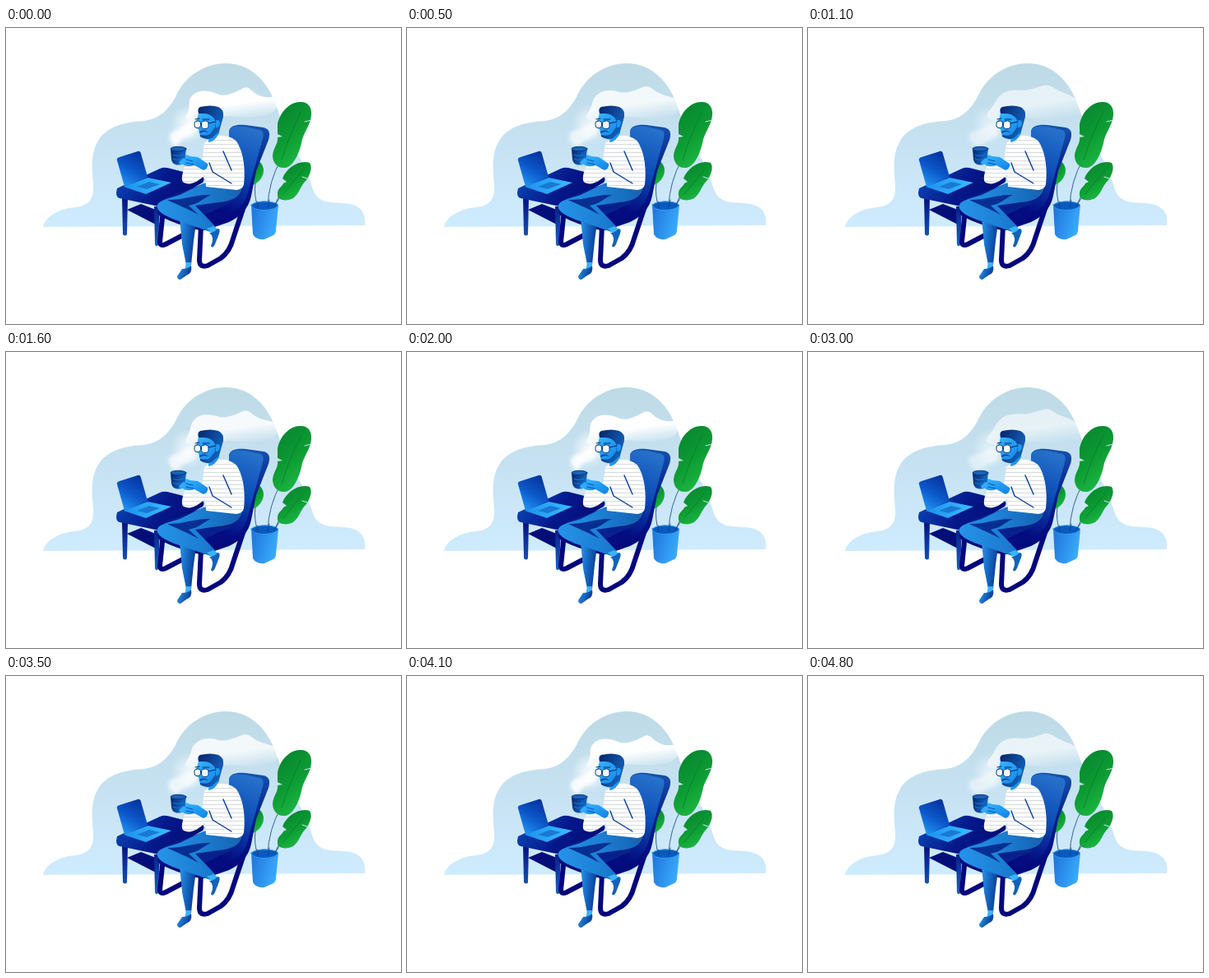
An HTML page that plays this animation: 480x360 px, repeating every 5 s.

```html
<!DOCTYPE html>
<html lang="en">
<head>
<meta charset="utf-8">
<title>Coffee break</title>
<style>
html, body { margin: 0; width: 100%; height: 100%; overflow: hidden; background: #fff; }
svg { display: block; width: 100vw; height: 100vh; }
</style>
</head>
<body>
<svg viewBox="0 0 480 360" fill="none" stroke-linecap="round" stroke-linejoin="round">
  <defs>
    <linearGradient id="sky" x2="0" y2="1"><stop stop-color="#bedae6"/><stop offset="1" stop-color="#cfebff"/></linearGradient>
    <linearGradient id="screen" x1=".2" y1="1" x2=".7" y2="0"><stop stop-color="#2298f3"/><stop offset=".5" stop-color="#0b57ca"/><stop offset="1" stop-color="#06339c"/></linearGradient>
    <linearGradient id="desk" y2=".3"><stop stop-color="#0c4cba"/><stop offset=".6" stop-color="#05188a"/><stop offset="1" stop-color="#040d78"/></linearGradient>
    <linearGradient id="post" x2="0" y2="1"><stop stop-color="#041080"/><stop offset="1" stop-color="#1765c4"/></linearGradient>
    <linearGradient id="keys"><stop stop-color="#1c92ee"/><stop offset="1" stop-color="#3bbcff"/></linearGradient>
    <linearGradient id="seat" x1=".8" x2=".4" y2="1"><stop stop-color="#2671ca"/><stop offset=".4" stop-color="#0c4bb5"/><stop offset=".8" stop-color="#040c80"/></linearGradient>
    <linearGradient id="rim" x2="0" y2="1"><stop stop-color="#1553ad"/><stop offset=".45" stop-color="#051c8b"/><stop offset="1" stop-color="#03067a"/></linearGradient>
    <linearGradient id="jeans"><stop stop-color="#2593e8"/><stop offset=".5" stop-color="#1c7fd4"/><stop offset="1" stop-color="#1561b0"/></linearGradient>
    <linearGradient id="shin" x2="1" y2=".3"><stop stop-color="#2897ed"/><stop offset="1" stop-color="#083c98"/></linearGradient>
    <linearGradient id="skin" x2=".8" y2="1"><stop stop-color="#3bb6ff"/><stop offset="1" stop-color="#1287e8"/></linearGradient>
    <linearGradient id="hair" x2="1" y2=".6"><stop stop-color="#06246b"/><stop offset="1" stop-color="#1464bc"/></linearGradient>
    <linearGradient id="leaf" x1=".2" x2=".7" y2="1"><stop stop-color="#078331"/><stop offset=".5" stop-color="#0c9a32"/><stop offset="1" stop-color="#20bd45"/></linearGradient>
    <linearGradient id="pot" y1=".2" x2="1" y2=".6"><stop stop-color="#1f75dc"/><stop offset="1" stop-color="#3aaefe"/></linearGradient>
    <linearGradient id="mug" x2="1" y2=".4"><stop stop-color="#052067"/><stop offset="1" stop-color="#146bc9"/></linearGradient>
    <linearGradient id="mist" gradientUnits="userSpaceOnUse" x1="275" y1="78" x2="280" y2="114"><stop offset=".4" stop-color="#fff"/><stop offset="1" stop-color="#fff" stop-opacity="0"/></linearGradient>
    <radialGradient id="glow"><stop stop-color="#fff"/><stop offset=".35" stop-color="#fff" stop-opacity=".8"/><stop offset="1" stop-color="#fff" stop-opacity="0"/></radialGradient>
    <filter id="soft" x="-50%" y="-50%" width="200%" height="200%"><feGaussianBlur stdDeviation="2"/></filter>
    <clipPath id="shirtClip"><use href="#shirt"/></clipPath>
  </defs>

  <path fill="url(#sky)" d="M45 242C48 229 64 220 84 218C103 216 107 206 106 190C104 168 103 152 112 137C123 119 146 114 168 113C188 110 198 98 206 84C216 60 240 43 267 43C292 43 310 58 321 78C334 102 337 130 351 149C365 166 369 186 374 199C382 216 402 211 418 214C432 217 438 227 436 240Z"/>

  <g id="steam">
    <ellipse id="halo" cx="222" cy="117" rx="22" ry="24" fill="url(#glow)"/>
    <path id="cloud" fill="url(#mist)"/>
    <path id="plume" fill="#fff" filter="url(#soft)"/>
  </g>

  <!-- plant -->
  <path stroke="#163f72" stroke-width=".8" d="M303 188Q301 204 306 218M334 160Q319 187 318 217M340 200Q330 207 326 218"/>
  <g fill="url(#leaf)">
    <path d="M297 161C305 157 313 165 313 173C313 183 304 191 296 192Z"/>
    <path d="M330 117C333 102 345 90 357 90C367 89 372 97 371 106C370 119 361 127 359 140C356 153 349 169 339 170C330 171 324 164 324 155C325 145 331 141 330 133L336 132L330 129Z"/>
    <path d="M336 183C341 170 356 160 369 164C373 170 369 179 365 185C359 190 356 202 349 207C342 211 331 210 330 204C329 195 335 194 337 189L341 187Z"/>
  </g>
  <path stroke="#087c30" stroke-width=".8" d="M359 101Q345 128 335 160M361 173Q349 187 337 202"/>
  <path stroke="#cce7f5" stroke-width="1" d="M371 112L363 114M366 183L360 181"/>
  <path fill="url(#pot)" d="M298 215L300 251Q304 258 314 257L325 252Q328 250 328 246L331 215Z"/>
  <path fill="#0a59be" stroke="#319ff2" d="M298 215Q305 210 319 211Q333 213 330 217Q323 223 306 221Q298 219 298 215Z"/>
  <path stroke="#163f72" stroke-width=".8" d="M305 211L306 219M320 209L318 218M331 206L326 217"/>

  <!-- table and laptop -->
  <path fill="#040e79" d="M147 221L164 214L187 223L184 240Z"/>
  <path fill="url(#post)" d="M141 206H148L147 251Q145 254 142 251ZM180 217H187L185 264Q182 267 181 263Z"/>
  <path fill="url(#desk)" d="M135 195L187 171Q191 169 196 170L239 181Q242 184 239 188L193 214Q188 218 181 216L138 207Q134 206 134 200Z"/>
  <path fill="url(#screen)" d="M135 161Q134 158 138 157L160 150Q163 149 164 153L172 181L144 193Z"/>
  <path fill="url(#keys)" d="M143 193L172 182L201 188L170 202Z"/>
  <path fill="#1a78d3" d="M159 193L174 187L187 190L171 196Z"/>

  <!-- chair -->
  <g stroke="#04087c" stroke-width="6">
    <path d="M191 221L187 260Q187 266 194 263L215 252"/>
    <path d="M237 240L235 282Q235 292 245 289L261 280Q272 272 276 256L291 211"/>
  </g>
  <path fill="url(#rim)" d="M271 126C272 118 282 117 291 118L313 121C321 123 321 129 319 136L304 174L298 204C295 220 284 230 271 236L242 246C231 247 203 237 188 229C180 224 186 215 194 211L272 196Z"/>
  <path fill="url(#seat)" d="M271 126C272 119 282 119 291 120L309 124C314 126 313 131 311 138L293 203C289 216 278 224 266 230L241 240L195 223L270 204Z"/>

  <!-- legs -->
  <path fill="url(#shin)" d="M211 231L231 237L228 259L225 288L219 288L214 263Z"/>
  <path fill="#36b5fb" d="M219 285H225L224 294L217 296Z"/>
  <path fill="url(#shin)" d="M214 293Q221 293 225 289Q227 298 219 301L212 306Q208 306 208 302Z"/>
  <path fill="#06218b" d="M193 207L244 188L288 195C286 207 274 213 259 219L225 235L193 222Z"/>
  <path fill="url(#jeans)" d="M240 189L287 195C284 207 272 211 258 212L230 216L255 242L248 248L217 237C204 233 187 227 184 219C181 210 199 207 211 203Z"/>
  <path fill="#072f92" d="M196 209C218 209 230 202 249 203C238 208 236 213 222 216L234 227C219 219 206 214 196 209Z"/>
  <path fill="#36b5fb" d="M244 244L252 241L259 246L251 250Z"/>
  <path fill="#1262bb" d="M247 249Q253 249 257 244Q261 244 259 250L254 263Q251 269 249 265Q254 254 247 249Z"/>

  <!-- torso -->
  <path id="shirt" fill="#fff" d="M241 140L254 131C265 130 278 132 282 141C289 154 291 173 289 190Q288 196 280 197L243 193L242 178C234 187 224 192 216 188C211 184 216 172 220 163L238 163Z"/>
  <path id="stripes" clip-path="url(#shirtClip)" stroke="#c3c9d2" stroke-width=".7"/>
  <path stroke="#073d9c" stroke-width="1.4" d="M247 164L251 175L274 189M264 150L274 173"/>
  <path fill="url(#skin)" d="M211 157Q217 152 224 156L233 157L245 165Q246 171 240 173L229 167Q220 170 215 166Z"/>
  <path stroke="#0756b3" d="M219 160L227 162M219 164L228 166"/>

  <!-- head -->
  <path fill="url(#skin)" d="M247 122L259 116L259 128Q253 139 246 139Z"/>
  <path fill="url(#skin)" d="M234 103L256 103L257 122L251 132Q244 136 236 132L234 123L230 121Z"/>
  <path fill="url(#hair)" d="M234 104Q232 98 236 96Q249 93 258 96Q265 99 264 108L259 126L250 134Q243 137 236 132L236 130Q244 132 248 129L254 121L254 112Q250 104 240 104Z"/>
  <path fill="#0a4a9e" d="M235 126Q241 122 246 127L241 126L235 128Z"/>
  <path fill="#1d96f2" d="M254 113Q259 110 260 115Q260 121 255 121Z"/>
  <path stroke="#082a64" stroke-width="1.2" d="M230 111L235 110M239 111L247 111M246 116L255 114"/>
  <g fill="#f3fbff" stroke="#0a3a86" stroke-width="1">
    <rect x="229" y="113" width="7.500" height="8.500" rx="3"/><rect x="237.500" y="113" width="8.500" height="9.500" rx="3"/>
  </g>

  <!-- cup -->
  <path fill="url(#mug)" d="M200 147H219L217 163Q213 168 206 166Q202 165 201 160Z"/>
  <ellipse cx="209.500" cy="147" rx="9.500" ry="2.700" fill="#1b62b8" stroke="#083780"/>
  <path stroke="#1680d6" d="M203 154Q208 157 215 154M203 159Q208 162 215 159"/>
  <path fill="#35aafa" d="M210 163L216 158Q220 160 217 164L212 167Z"/>
</svg>
<script>
const get = id => document.getElementById(id);
const loop = 5000, step = 100, breath = 2000;
// Each point holds its dense position, then its offset when the steam thins.
const cloudPoints = [
  [216, 112, -3, -2], [223, 99, 2, -4], [222, 87, 8, -2], [231, 77, 9, 0], [248, 76, 5, -1],
  [262, 83, 2, -7], [278, 79, 2, -7], [293, 70, -1, -2], [302, 80, 1, -4], [315, 85, 3, -4],
  [328, 83, 3, 7], [331, 96, 3, 7], [319, 107, 4, 3], [294, 109, 0, 3], [263, 106, 0, 2], [236, 115, 0, 0]
];
const plumePoints = [
  [208, 146, 0, 0], [200, 139, -3, 0], [198, 127, -4, 0], [214, 122, -6, 2],
  [229, 110, -2, 5], [234, 115, 0, 3], [230, 129, 0, 4], [212, 136, 4, 2]
];

function blob(points, k) {
  const p = points.map(([x, y, dx, dy]) => [x + dx * k, y + dy * k]);
  const mid = i => {
    const a = p[i], b = p[(i + 1) % p.length];
    return [(a[0] + b[0]) / 2, (a[1] + b[1]) / 2];
  };
  return "M" + mid(p.length - 1) + p.map((q, i) => "Q" + q + " " + mid(i)).join("") + "Z";
}

get("stripes").setAttribute("d", Array.from({ length: 12 }, (_, i) => `M210 ${136.5 + i * 5}H292`).join(""));

function draw(now) {
  const t = Math.min(Math.floor(now % loop / step) * step, 4800);
  const k = (1 - Math.cos(t / breath * 2 * Math.PI)) / 2;
  get("cloud").setAttribute("d", blob(cloudPoints, k));
  get("plume").setAttribute("d", blob(plumePoints, k));
  get("cloud").setAttribute("opacity", 1 - .4 * k);
  get("plume").setAttribute("opacity", .9 - .45 * k);
  get("halo").setAttribute("opacity", .75 - .25 * k);
  requestAnimationFrame(draw);
}
draw(performance.now());
</script>
</body>
</html>
```
